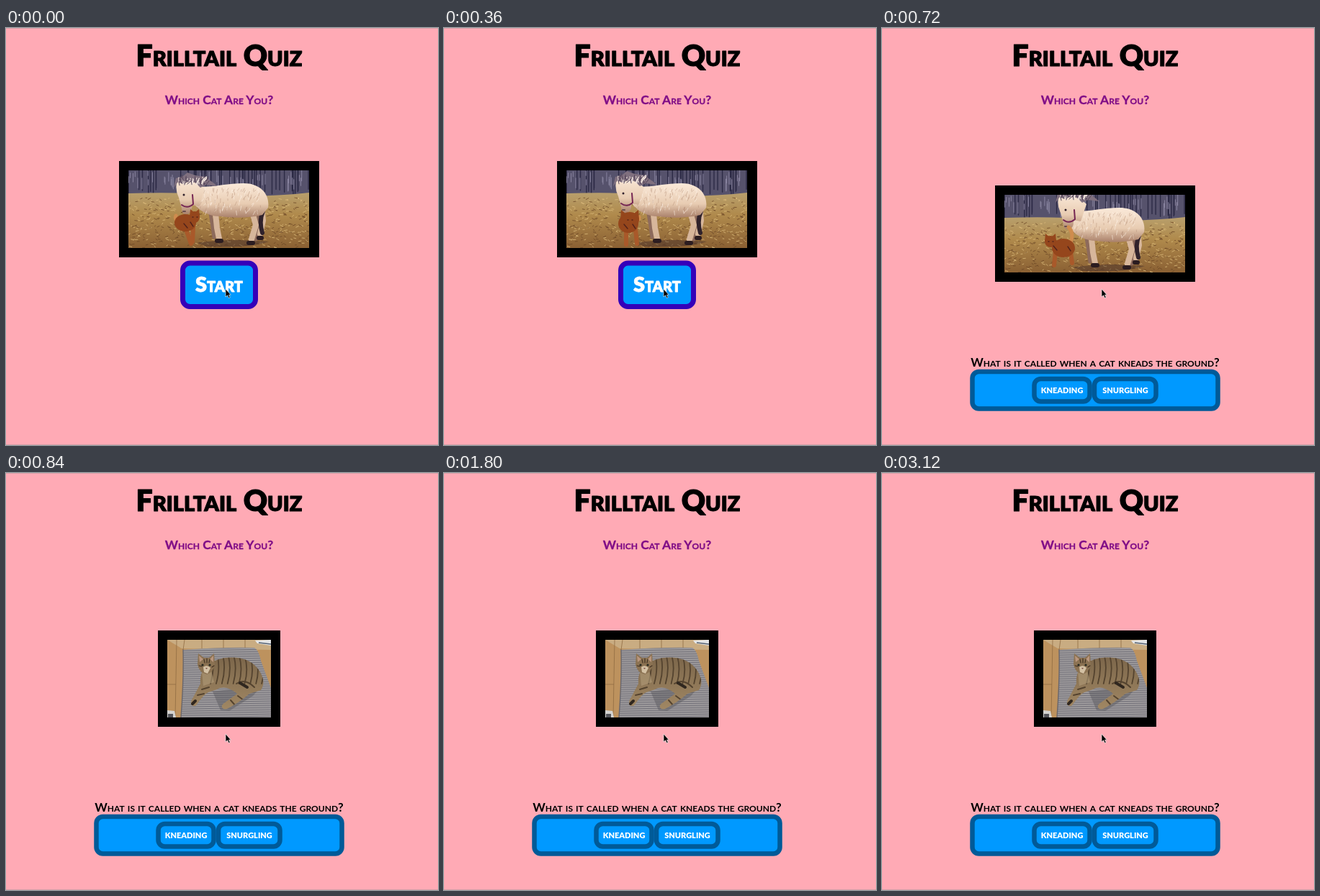
Write an HTML page that moves like this. It is 600 px wide and 580 px high and loops after 3.24 s.

```html
<!DOCTYPE html>
<html lang="en">
<head>
<meta charset="utf-8">
<title>Cat quiz</title>
<style>
  html, body { margin: 0; width: 100%; height: 100%; overflow: hidden; background: #ffaab5; }
  svg { display: block; width: 600px; height: 580px; }
  text {
    font-family: Lato, sans-serif; font-weight: 700; font-variant-caps: small-caps;
    text-anchor: middle; paint-order: stroke; stroke-linejoin: round;
  }
  .bold { font-weight: 900; }
  .line { fill: none; stroke-linecap: round; stroke-linejoin: round; }
</style>
</head>
<body>
<svg viewBox="0 0 600 580">
  <defs>
    <linearGradient id="field" x2="0" y2="1">
      <stop offset="0" stop-color="#b89f6c"/>
      <stop offset=".4" stop-color="#b08a4c"/>
      <stop offset="1" stop-color="#8a6033"/>
    </linearGradient>
    <linearGradient id="coat" x2="0" y2="1">
      <stop offset="0" stop-color="#fbeada"/>
      <stop offset=".6" stop-color="#e8ccb2"/>
      <stop offset="1" stop-color="#a9806a"/>
    </linearGradient>
    <linearGradient id="tabbyFur" x2="0" y2="1">
      <stop offset="0" stop-color="#7d674b"/>
      <stop offset="1" stop-color="#a08763"/>
    </linearGradient>
    <pattern id="weave" width="8" height="3" patternUnits="userSpaceOnUse" patternTransform="rotate(-1)">
      <rect width="8" height="3" fill="#a6a3a3"/>
      <rect width="8" height="1.4" fill="#74727a"/>
    </pattern>
    <clipPath id="ponyClip"><rect width="251" height="108"/></clipPath>
    <clipPath id="tabbyClip"><rect width="144" height="108"/></clipPath>
    <clipPath id="furClip"><use href="#fur"/></clipPath>
  </defs>

  <rect width="600" height="580" fill="#ffaab5"/>
  <path d="M0 .5H600M0 579.5H600" stroke="#d6a0a8"/>
  <text class="bold" x="296" y="53" font-size="41" stroke="#000" stroke-width="1">Frilltail Quiz</text>
  <text x="296" y="106" font-size="17.4" fill="#7f0c86" stroke="#7f0c86" stroke-width=".3">Which Cat Are You?</text>

  <g id="pony">
    <rect x="-13" y="-13" width="278" height="134"/>
    <g clip-path="url(#ponyClip)">
      <rect width="251" height="36" fill="#56526c"/>
      <path id="trunks" class="line" stroke="#2c2a45" stroke-width="1.4"/>
      <path id="gaps" class="line" stroke="#8f8ba6" stroke-width=".9"/>
      <path d="M0 32Q70 30 130 34T251 31V108H0Z" fill="url(#field)"/>
      <path id="straw" class="line" stroke="#dcbb7c" stroke-width=".8"/>
      <path id="shade" class="line" stroke="#6b4726" stroke-width=".8"/>
      <path d="M95 101Q140 94 195 99Q170 108 110 106Z" fill="#49302a" opacity=".5"/>
      <path class="line" d="M114 60L117 78 119 93M181 56L180 80 177 96" stroke="#8d6a5c" stroke-width="5"/>
      <path class="line" d="M121 60L123 80 126 95M172 58L177 76 171 96M185 50L187 70 183 88" stroke="#d7b69b" stroke-width="8"/>
      <path class="line" d="M123 98H129M167 101H173M181 94H185" stroke="#2b1c20" stroke-width="6"/>
      <path class="line" d="M187 57Q181 70 186 87" stroke="#30222b" stroke-width="6"/>
      <path d="M88 20C108 27 130 18 160 18 185 18 197 35 194 52L186 62C165 67 143 66 128 64 112 64 101 57 94 50 87 42 84 28 88 20Z" fill="url(#coat)"/>
      <path id="fuzz" class="line" stroke="#fff4e8" stroke-width=".9" opacity=".6"/>
      <path id="fuzzShade" class="line" stroke="#b58f78" stroke-width=".8" opacity=".6"/>
      <g id="head">
        <path d="M68 14Q77 7 91 12L106 26 98 50 88 48Q89 60 81 61 74 62 74 53L70 38Q64 26 68 14Z" fill="url(#coat)"/>
        <path d="M63 24L66 11 76 8 82 3 93 7 106 9 119 18 123 22 108 20 100 24 93 17 84 16 75 19 69 16Z" fill="#80707f"/>
        <path id="mane" class="line" stroke="#efe2dc" stroke-width="1.1"/>
        <path id="maneShade" class="line" stroke="#55455a" stroke-width="1"/>
        <path class="line" d="M74 48Q82 54 90 47L89 34" stroke="#752653" stroke-width="2"/>
        <circle cx="77" cy="34" r="1.5" fill="#30202b"/>
        <path class="line" d="M76 57H79" stroke="#694d4d" stroke-width="2"/>
      </g>
      <g id="kitten"></g>
    </g>
  </g>

  <g id="tabby" transform="translate(224 232)">
    <rect x="-13" y="-13" width="170" height="134"/>
    <g clip-path="url(#tabbyClip)">
      <rect width="144" height="108" fill="#bd925e"/>
      <path d="M0 0H144V14L20 12Z" fill="#c9ac82"/>
      <path d="M13 0L11 108M24 0L22 14M0 62H12M48 0V12M78 0V12M108 0V12" stroke="#916c43" stroke-width=".8"/>
      <path d="M122 1L144 0V8L125 5Z" fill="#e4e5e6"/>
      <path d="M127 4L144 6" stroke="#556274" stroke-width="1.4"/>
      <path d="M0 98L10 99 12 108H0Z" fill="#d4d3d0"/>
      <path d="M1 103H8V108H1Z" fill="#55565c"/>
      <path d="M22 14Q75 10 121 11 127 14 130 29L144 67V108H19Q23 55 22 14Z" fill="url(#weave)"/>
      <path d="M22 14Q23 55 19 108" class="line" stroke="#69666c" stroke-width="1.4"/>
      <path d="M63 72Q95 68 131 64L119 78 86 99 74 98Z" fill="#47454c" opacity=".35"/>
      <path id="fur" d="M57 34C75 22 103 21 120 34 133 46 137 60 130 70L114 75C105 83 93 91 83 96 76 98 73 92 79 88L97 75C87 67 78 64 69 69L57 73C49 77 44 87 39 92 31 93 32 85 36 80L46 61C45 49 49 40 57 34Z" fill="url(#tabbyFur)"/>
      <g clip-path="url(#furClip)">
        <path id="stripes" class="line" stroke="#54432f" stroke-width="1.8"/>
        <path class="line" d="M48 69L58 66M42 77L51 75M98 78L106 84M88 84L95 92M96 61Q108 53 121 66" stroke="#54432f" stroke-width="2"/>
        <path d="M48 45L61 43 65 59 50 64Z" fill="#b19b78" opacity=".6"/>
      </g>
      <path class="line" d="M35 89L39 85M101 60L111 66" stroke="#30271f" stroke-width="4"/>
      <path d="M43 19L51 25 58 25 65 19 66 35Q63 46 55 48 44 46 42 34Z" fill="#8b7252"/>
      <path d="M44 22L50 27 45 31ZM64 22L59 27 64 31Z" fill="#ba967d"/>
      <path d="M50 38Q55 34 60 39L56 47 51 45Z" fill="#d3c1a4"/>
      <path class="line" d="M51 27L52 32M55 26V32M59 27L58 32M44 36L48 37M62 38L65 36" stroke="#403122" stroke-width="1.2"/>
      <circle cx="49" cy="35" r="1.6" fill="#25281f"/>
      <circle cx="59" cy="35" r="1.6" fill="#25281f"/>
      <path d="M53 39H56L54.5 41Z" fill="#7d5147"/>
    </g>
  </g>

  <g id="start" fill="#fff">
    <rect x="245.5" y="327" width="101" height="60.5" rx="10" fill="#09f" stroke="#3500b9" stroke-width="7"/>
    <text class="bold" x="296" y="367" font-size="29" stroke="#fff" stroke-width=".8">Start</text>
  </g>

  <g id="question">
    <text x="296" y="471" font-size="16.75">What is it called when a cat kneads the ground?</text>
    <g fill="#09f" stroke="#005a98" stroke-width="6.5">
      <rect x="125.5" y="478" width="341" height="51.5" rx="9"/>
      <rect x="211.5" y="488" width="77" height="31.5" rx="9"/>
      <rect x="295" y="488" width="85.5" height="31.5" rx="9"/>
    </g>
    <g fill="#fff" font-size="16.2">
      <text class="bold" x="250" y="508">kneading</text>
      <text class="bold" x="338" y="508">snurgling</text>
    </g>
  </g>

  <path d="M305 363V374L307.6 371.8 309.4 375.5 311.2 374.7 309.5 371.2H312.3Z" stroke="#fff" stroke-width=".6"/>
</svg>

<script>
const LOOP = 3240, STEP = 120, QUESTION_AT = 480, TABBY_AT = 840;
const byId = id => document.getElementById(id);

let seed = 7;
const random = (min, max) => {
  seed = (seed * 16807) % 2147483647;
  return min + (max - min) * seed / 2147483647;
};
const setMarks = (id, count, mark) =>
  byId(id).setAttribute('d', Array.from({ length: count }, (_, i) => mark(i)).join(''));

setMarks('trunks', 48, () => `M${random(0, 251)} 0v${random(24, 34)}`);
setMarks('gaps', 44, () => `M${random(0, 251)} ${random(0, 14)}v${random(6, 17)}`);
for (const id of ['straw', 'shade'])
  setMarks(id, 300, () => `M${random(0, 251)} ${random(38, 108)}l${random(1, 4)} ${random(-2, 2)}`);
for (const id of ['fuzz', 'fuzzShade'])
  setMarks(id, 60, () => `M${random(96, 184)} ${random(24, 57)}l${random(-3, 1)} ${random(2, 6)}`);
for (const id of ['mane', 'maneShade'])
  setMarks(id, 20, () => `M${random(68, 110)} ${random(15, 21)}l${random(-3, 7)} ${random(-9, -4)}`);
setMarks('stripes', 10, i => `M${62 + i * 7.5} 21q${4 + i * .4} 19 ${-2 + i * .4} 40`);

// Each pose holds the moving pony head and the joints of the kitten.
const poses = [
  { at: 0, head: [0, 0], body: [79, 73, 15, 12], face: [92, 65, 7, 8],
    legs: [80, 82, 87, 102, 90, 79, 89, 99], tail: [68, 70, 64, 67, 66, 63] },
  { at: 360, head: [2, -2], body: [86, 74, 14, 13], face: [88, 69, 13, 11],
    legs: [83, 83, 83, 103, 96, 82, 98, 102], tail: [97, 71, 101, 69, 101, 65] },
  { at: 480, head: [7, -12], body: [84, 74, 16, 13], face: [66, 64, 8, 8],
    legs: [73, 79, 71, 98, 94, 79, 96, 95], tail: [93, 67, 97, 53, 88, 46] },
  { at: 720, head: [8, -13], body: [82, 74, 16, 13], face: [64, 65, 8, 8],
    legs: [71, 79, 69, 98, 92, 79, 94, 95], tail: [92, 67, 97, 52, 89, 45] }
];

function poseAt(time) {
  const next = Math.max(1, poses.findIndex(p => p.at >= time));
  const a = poses[next - 1], b = poses[next];
  const k = (time - a.at) / (b.at - a.at);
  return key => a[key].map((value, i) => value + (b[key][i] - value) * k);
}

const ellipse = ([x, y, rx, ry]) => `<ellipse cx="${x}" cy="${y}" rx="${rx}" ry="${ry}"/>`;

function drawPony(time) {
  const pose = poseAt(time);
  const [x, y, rx, ry] = pose('face');
  const [a, b, c, d, e, f, g, h] = pose('legs');
  const [p, q, r, s, u, v] = pose('tail');
  byId('head').setAttribute('transform', `translate(${pose('head')})`);
  byId('kitten').innerHTML = `
    <g class="line" stroke="#a9592a">
      <path d="M${a} ${b}L${c} ${d}M${e} ${f}L${g} ${h}" stroke-width="6"/>
      <path d="M${p} ${q}Q${r} ${s} ${u} ${v}" stroke="#cf8c4e" stroke-width="5"/>
    </g>
    <g fill="#95461c">${ellipse(pose('body'))}${ellipse([x, y, rx, ry])}
      <path d="M${x - rx} ${y}l1 ${-ry - 3} 6 5M${x + rx} ${y}l-1 ${-ry - 3} -6 5"/>
    </g>
    <path class="line" d="M${x - 3} ${y}h1M${x + 3} ${y}h1M${a - 3} ${b - 8}l5 6M${e - 4} ${f - 7}l4 6"
      stroke="#52231b" stroke-width="1.4"/>`;
}

const show = (id, visible) => byId(id).style.display = visible ? '' : 'none';

function render(now) {
  const time = Math.floor(now % LOOP / STEP) * STEP;
  const asking = time >= QUESTION_AT, ponyShown = time < TABBY_AT;
  show('start', !asking);
  show('question', asking);
  show('pony', ponyShown);
  show('tabby', !ponyShown);
  if (ponyShown) {
    byId('pony').setAttribute('transform', `translate(170 ${asking ? 232 : 198})`);
    drawPony(time);
  }
}

const startTime = performance.now();
function tick() {
  render(performance.now() - startTime);
  requestAnimationFrame(tick);
}
tick();
</script>
</body>
</html>
```
